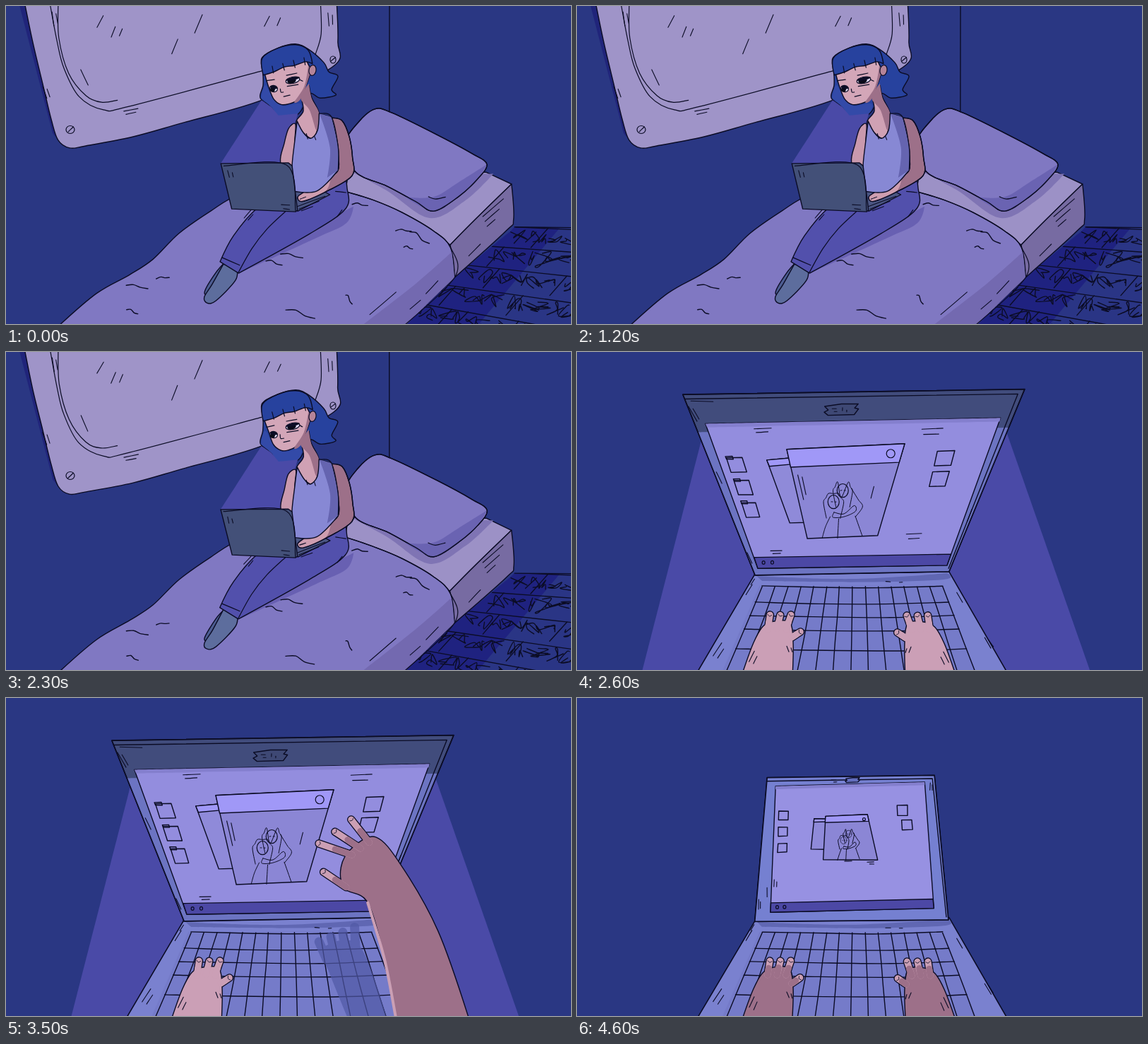
An HTML page that plays this animation: 800 by 450 pixels, repeating every 4.7 s.

```html
<!DOCTYPE html>
<html lang="en">
<head>
<meta charset="utf-8">
<title>Late night laptop</title>
<style>
html, body { margin: 0; width: 100%; height: 100%; overflow: hidden; background: #2a3783; }
svg { display: block; width: 100vw; height: 100vh; }
</style>
</head>
<body>
<svg id="stage" viewBox="0 0 800 450" stroke-linecap="round" stroke-linejoin="round"></svg>
<script>
const LOOP = 4700, STEP = 100, CUT = 2400;
const INK = '#0b0c25', WALL = '#2a3783', BEAM = '#4a4aa7';
const SKIN = '#cb9fb4', SKIN_DARK = '#9d7089', HAIR = '#27429e', QUILT = '#8078c2';
const stage = document.getElementById('stage');
let pose = 0;

const NUM = /-?\d+(\.\d+)?/g;
const span = (t, a, b) => Math.max(0, Math.min(1, (t - a) / (b - a)));
const ease = v => v * v * (3 - 2 * v);
const rnd = n => { const s = Math.sin(n * 12.9898) * 43758.5453; return s - Math.floor(s); };
const times = (n, f) => Array.from({ length: n }, (_, i) => f(i)).join('');
const mix = (a, b, u) => {
  const to = b.match(NUM);
  let i = 0;
  return a.replace(NUM, v => +v + (to[i++] - v) * u);
};
const tint = (a, b, u) => `rgb(${mix(a, b, u)})`;
const numbers = text => text.match(NUM).map(Number);

// Points are "x,y x,y"; "!" marks a corner, a trailing "z" closes the shape.
function trace(text, straight) {
  const closed = text.endsWith('z');
  const pts = text.replace('z', '').trim().split(/\s+/).map(s => {
    const [x, y] = numbers(s);
    const wobble = k => (rnd(x * 7.1 + y * 13.7 + pose * 31 + k) - .5) * .8;
    return { x: x + wobble(1), y: y + wobble(2), sharp: straight || s.endsWith('!') };
  });
  const n = pts.length;
  const at = i => closed ? pts[(i + n) % n] : pts[Math.max(0, Math.min(n - 1, i))];
  const put = (x, y) => `${x.toFixed(1)} ${y.toFixed(1)}`;
  const handle = (i, side) => {
    const p = at(i), k = p.sharp ? 0 : side / 6;
    return put(p.x + (at(i + 1).x - at(i - 1).x) * k, p.y + (at(i + 1).y - at(i - 1).y) * k);
  };
  let d = 'M' + put(pts[0].x, pts[0].y);
  for (let i = 0; i < (closed ? n : n - 1); i++) {
    d += `C${handle(i, 1)} ${handle(i + 1, -1)} ${put(at(i + 1).x, at(i + 1).y)}`;
  }
  return d + (closed ? 'Z' : '');
}

const path = (d, fill, line, w) => `<path d="${d}" fill="${fill}" stroke="${line}" stroke-width="${w}"/>`;
const curve = (pts, fill = 'none', line = INK, w = 1.4) => path(trace(pts), fill, line, w);
const poly = (pts, fill = 'none', line = INK, w = 1.4) => path(trace(pts, true), fill, line, w);
const lines = (list, w = 1.2) => list.split(';').map(s => curve(s.trim(), 'none', INK, w)).join('');
const oval = (x, y, rx, ry, fill = 'none', line = INK, turn = 0) =>
  `<ellipse cx="${x}" cy="${y}" rx="${rx}" ry="${ry}" fill="${fill}" stroke="${line}" stroke-width="1.2" transform="rotate(${turn} ${x} ${y})"/>`;
const group = (body, attrs) => `<g ${attrs}>${body}</g>`;
const shift = (x, y, body) => group(body, `transform="translate(${x} ${y})"`);

// A few parallel pen strokes of falling length.
const hatch = (x, y, dx, dy, n = 2, gap = 6) => times(n, i => {
  const k = 1 - i * .3, sx = x + (Math.abs(dy) > Math.abs(dx) ? gap * i : 3 * i);
  const sy = y + (Math.abs(dy) > Math.abs(dx) ? 3 * i : gap * i);
  return curve(`${sx},${sy} ${sx + dx * k},${sy + dy * k}`, 'none', INK, 1.1);
});
const crease = (x, y, w, drop) =>
  curve(`${x},${y} ${x + w * .35},${y - 2 + drop * .2} ${x + w * .65},${y + drop * .7} ${x + w},${y + drop}`);

function floor() {
  const edge = '720,313 805,313 805,455 558,455 636,383 712,320 z';
  let out = poly(edge, '#2a3585', 'none') + poly('712,313 785,313 665,455 550,455 z', '#1f2280', 'none');
  for (let row = 0; row < 6; row++) {
    const x0 = 722 - row * 34, y0 = 313 + row * 27, slope = .04 + row * .035;
    const y = x => y0 + (x - x0) * slope;
    out += poly(`${x0},${y0} 810,${y(810)}`);
    for (let x = x0 + 45 - row % 2 * 28; x < 800; x += 95) out += poly(`${x},${y(x)} ${x - 24},${y(x) + 27}`);
    for (let x = x0 - 8; x < 800; x += 17) {
      const wander = times(6, i => `${x + rnd(x + i * 5 + row) * 26},${y(x) + 4 + rnd(x * 3 + i + row * 7) * 20} `);
      out += curve(wander);
    }
  }
  return `<clipPath id="floor"><path d="${trace(edge, true)}"/></clipPath>` +
    group(out, 'clip-path="url(#floor)"') + poly('720,313 805,314');
}

const mirror = () =>
  poly('18,-5 34,-5 80,197 66,180 z', '#20247a', 'none') +
  curve('26,-5! 38,53 52,110 64,160 74,190 90,201 112,198 180,185 250,165 362,133 464,85 470,50 468,-5! z', '#9f94c8') +
  lines('62,-5 72,50 82,88 103,128 138,147 175,142 362,92; 74,-5 75,45 89,95 113,127 135,136 158,133; 445,-5 446,40 438,68') +
  hatch(138, 14, -9, 16, 1) + hatch(155, 29, -6, 15, 2, 10) + hatch(278, 12, -11, 26, 1) + hatch(243, 47, -8, 21, 1) +
  hatch(373, 14, -7, 15, 2, 16) + hatch(65, 8, 3, 20) + hatch(52, 114, 6, 17) + hatch(106, 90, 10, 22, 1) +
  hatch(167, 149, 20, -4, 2, 4) + hatch(456, 10, 1, 18) +
  oval(91, 175, 6, 5.5) + lines('88,178 95,171') + oval(463, 76, 4, 5) + lines('460,78 466,73');

function bed() {
  const pillow = '481,195 498,165 522,146 546,151 610,182 660,209 681,224 668,245 640,270 606,290 580,277 540,255 495,235 z';
  return floor() +
    curve('485,235! 680,235! 716,252! 665,301 629,338! 560,300 480,265! z', '#9c91c6') +
    curve('716,252! 719,302 708,319 635,384! 629,338! 665,301 z', '#776ba2') +
    curve('76,452! 128,407 175,380 208,358 245,322 290,290 330,267 400,250! 483,263! 520,275 560,292 605,318 629,342 635,384! 560,455! 72,455! z', QUILT) +
    curve('631,348! 580,393 500,455! 562,455! 635,384! z', '#7369b0', 'none') +
    lines('483,263 520,275 560,292 605,318 629,342 635,384 560,455') +
    curve('490,235! 540,262 600,300 650,275 690,238! z', '#7f74b4', 'none') +
    curve(pillow, QUILT) +
    curve('681,224! 668,245 640,270 606,290 565,270! 605,270 640,250 z', '#6a63b2', 'none') +
    curve(pillow, 'none') + lines('598,270 608,273 622,270') +
    curve('329,379! 440,328 482,307 492,284! 400,330! z', '#6860b2', 'none') +
    hatch(675, 298, 29, -25, 3, 7) + hatch(655, 354, 17, -17, 1) + hatch(515, 437, 37, -32, 1) + hatch(595, 407, 17, -18, 1) + hatch(572, 429, 15, -13, 1) +
    crease(170, 395, 31, 5) + crease(171, 430, 16, 6) + crease(213, 386, 18, -2) + crease(396, 430, 41, 12) + crease(552, 318, 22, 1) +
    crease(572, 320, 27, 16) + crease(563, 341, 13, 3) + crease(389, 351, 31, 5) + crease(368, 361, 23, 6) + crease(490, 281, 22, 1) + crease(481, 409, 9, 13);
}

function head() {
  const eye = (x, y, rx, turn) => oval(x, y, rx, 4.6, '#ded8f1', INK, turn) +
    oval(x - 1.5, y + 1, rx * .62, 3.6, '#090a18', 'none', turn) +
    oval(x, y - 2, rx, 2.2, INK, 'none', turn);
  return curve('366,96! 372,114 379,131 389,139 400,139 413,132 426,110 432,90! 424,74! 380,83! z', '#d3a6b8') +
    curve('428,86! 422,114 408,136 419,129 433,88! z', SKIN_DARK, 'none') +
    oval(434, 91, 5, 7.5, '#b58499', INK, 10) +
    curve('364,98! 363,74 385,60 410,55 428,62 434,82! 424,79 408,84 394,86 380,93 z', HAIR) +
    times(4, i => lines(`${379 + i * 15},${95 - i * 4} ${377 + i * 15},${85 - i * 4}`)) +
    eye(379, 117, 5.5, 12) + eye(406, 105, 10, -12) +
    lines('369,106 380,104; 397,98 412,95; 388,117 389,122 393,122; 393,128 402,126; 398,114 414,111; 416,104 420,106');
}

function girl() {
  const tap = [0, -.7, .5][pose];
  const arm = `460,158! 476,162 486,185 491,214 490,240 455,262 421,${276 + tap} 413,${271 + tap} 422,${263 + tap} 447,246 470,232 468,195 z`;
  return curve('364,92! 363,73 385,60 410,54 428,61 450,80 457,93 470,99 461,118 467,126 445,130 430,124 417,149 405,156 387,155 376,143 360,130 364,112 z', HAIR) +
    curve('361,130! 367,112 379,131 392,141 417,138 412,153 387,156 376,143 z', '#334aa8', 'none') +
    poly('304,223 362,133 376,143 386,155 413,152 409,168 399,177 391,222 z', BEAM, 'none') +
    curve('311,362! 297,378 281,405 290,406 312,382 z', '#4d5d92') +
    curve('308,365! 327,370! 325,388 297,417 285,420 281,412 292,394 z', '#5d6d9d') +
    curve('406,255! 470,232 483,260 480,288 430,322 329,378! 303,362! 322,325 357,285 z', '#5250ac') +
    lines('398,289 370,315 348,343 329,377; 306,356 331,367; 467,262 481,264') + hatch(337, 300, 10, -11) + hatch(469, 298, 7, -9, 1) +
    curve('410,167 400,173 394,195 389,221 402,250 407,240! 409,190 z', '#c999ad') +
    poly('402,262 446,260 459,267 413,290 z', '#4b5683') + hatch(412, 284, 40, -15, 3, 3) +
    curve(arm, SKIN_DARK) +
    curve(`470,233! 447,246 422,${263 + tap} 413,${271 + tap} 421,${276 + tap} 452,263 461,243 z`, '#cf9eb0', 'none') +
    curve(arm) + lines(`416,${273 + tap} 424,${270 + tap}`) +
    curve('416,125! 421,148 411,166 431,187 440,178 443,152 433,130 429,112! z', '#d0a1b4') +
    curve('429,110! 417,130 430,147 440,176 443,152 433,132 z', SKIN_DARK, 'none') +
    curve('412,163! 409,190 405,225 405,262! 440,262 470,232! 470,200 461,157! 443,152! 441,176 431,187 421,179 z', '#8788d4') +
    curve('444,152! 461,157! 470,200 470,232! 455,243! 459,200 z', '#6564b0', 'none') +
    lines('444,152 461,157 470,200 470,232') + hatch(425, 181, 2, 7, 2, 12) +
    head() +
    poly('304,223 400,222 405,226 413,289 410,291 320,287 z', '#435078') +
    lines('308,226 397,225 410,290') + hatch(314, 233, 2, 9) + hatch(390, 281, 12, 1);
}

const bedroom = () => poly('543,-5 543,150') + mirror() + bed() + girl();

// The grip text holds: first tip, tip step, first knuckle, knuckle step, thumb tip, thumb root.
function hand(arm, grip, tone) {
  const [tx, ty, tdx, tdy, kx, ky, kdx, kdy, ...thumb] = numbers(grip);
  const fingers = [0, 1, 2].map(i => [tx + tdx * i, ty + tdy * i, kx + kdx * i, ky + kdy * i]).concat([thumb]);
  const draw = (color, w) => fingers.map(([x, y, a, b]) => curve(`${x},${y} ${a},${b}`, 'none', color, w)).join('');
  const nails = fingers.map(([x, y, a, b]) => {
    const d = Math.hypot(a - x, b - y), c = (a - x) / d * 2, s = (b - y) / d * 2;
    return lines(`${x + s * 1.5},${y - c * 1.5} ${x + c},${y + s} ${x - s * 1.5},${y + c * 1.5}`, .9);
  }).join('');
  return draw(INK, 11.6) + curve(arm + ' z', tone) + draw(SKIN, 9) +
    fingers.map(([x, y, a, b]) => curve(`${(x + a) / 2},${(y + b) / 2} ${a},${b}`, 'none', tone, 9)).join('') + nails;
}

const typingHand = u =>
  hand('234,455! 250,412 264,388 284,380 302,384 306,412 305,455!', '273,372 15,0 270,392 13,0 316,396 304,404',
    tint('203,159,182', '157,112,137', u)) + hatch(244, 438, 7, -15) + hatch(297, 416, 3, 8);

const reachingHand = u =>
  hand(mix('552,455! 536,370 512,290 480,270 474,240 490,212 524,197 560,237 612,330 656,455!',
    '460,455! 464,370 473,290 470,262 476,243 490,232 515,230 522,258 548,335 588,455!', u),
  mix('443,206 23,-17 490,222 12,-9 450,246 482,268', '472,221 16,-2 481,248 13,-3 465,244 475,264', u), SKIN_DARK) +
  curve(mix('552,453 536,370 512,290', '462,453 466,370 475,290', u), 'none', SKIN, 4);

// Maps unit coordinates into a four-cornered area given clockwise from top left.
const area = text => {
  const [ax, ay, bx, by, cx, cy, dx, dy] = numbers(text);
  const blend = (a, b, c, d, x, y) => (a + (b - a) * x) * (1 - y) + (d + (c - d) * x) * y;
  const at = (x, y) => [blend(ax, bx, cx, dx, x, y), blend(ay, by, cy, dy, x, y)];
  const box = (x, y, w, h, fill, line) => poly(
    [at(x, y), at(x + w, y), at(x + w, y + h), at(x, y + h)].join(' ') + ' z', fill, line);
  return { at, box };
};

function family(x, y, s) {
  const person = (px, py, r) => oval(px, py, r, r * 1.2) +
    curve(times(9, i => {
      const a = Math.PI * (.8 + i * .175), k = r * (1.5 + .25 * (i % 2));
      return `${px + Math.cos(a) * k},${py + Math.sin(a) * k + (i === 0 || i === 8 ? r * 2 : 0)} `;
    }), 'none', INK, 1 / s) + lines(`${px - 3},${py} ${px - 1},${py}; ${px + 2},${py} ${px + 4},${py}`, 1);
  return group(person(0, -25, 8) + person(-13, -9, 8) +
    lines('12,-28 22,-12 28,-2 18,12; -18,12 -24,26 -29,42; -6,15 -7,42; 18,11 28,39; -12,6 2,8 16,-4 18,4 2,12 -14,13 -12,6', 1 / s),
    `transform="translate(${x} ${y}) scale(${s})"`);
}

function lid(u) {
  const frame = mix('150,60 634,53 527,311 252,316', '269,113 506,109 526,314 252,316', u);
  const body = area(frame);
  const view = area(mix('182,101 600,93 524,302 256,306', '281,125 492,119 505,298 274,303', u));
  const pane = mix('297,138 464,130 426,260 326,264', '352,167 411,165 426,229 349,229', u);
  const win = area(pane), back = area(mix('269,153 301,150 323,241 301,242', '336,171 354,171 351,214 331,214', u));
  let out = poly(frame + ' z', tint('65,76,124', '112,123,205', u)) +
    body.box(0, .21 * (1 - u), 1, 1 - .21 * (1 - u), tint('108,116,194', '117,128,209', u), 'none') +
    poly(frame + ' z', 'none', INK, 1.7) + poly([body.at(0, .025), body.at(.985, .025), body.at(.99, .98)].join(' ')) +
    view.box(0, 0, 1, 1, tint('147,141,222', '151,145,226', u)) +
    view.box(0, 0, 1, .025, '#847fce', 'none') + view.box(0, .925, 1, .075, '#4c48a5');
  for (const x of [.04, .085]) out += oval(...view.at(x, .962), 2, 2.4);

  // desktop icons
  const squash = 1 - .17 * u;
  for (let i = 0; i < 3; i++) {
    const y = (.24 + i * .155) * squash;
    out += view.box(.03, y, .06, .1 - .03 * u, 'none');
    if (u < .5) out += view.box(.03, y - .012, .025, .02, 'none');
    if (i < 2) out += view.box(.81 + .025 * i * u, y - .02 - i * .015, .065, .1 - .02 * u, 'none');
  }

  out += back.box(0, 0, 1, 1, '#8f8ad9') + back.box(0, 0, 1, .1, '#a098f7') +
    win.box(0, 0, 1, 1, '#8b86d5') + win.box(0, 0, 1, .2 - .05 * u, '#a098f7') +
    oval(...win.at(.9, .1), 6 - 4 * u, 6 - 4 * u) + family(...win.at(.49, .68 - .04 * u), 1 - .45 * u);
  const tape = area(mix('351,77 398,73 395,88 353,90', '381,114 400,113 399,119 381,120', u));
  out += poly([[0, 0], [.5, -.1], [1, 0], [.92, .4], [1.05, .5], [.94, 1], [.05, 1], [-.05, .6], [.08, .4]]
    .map(p => tape.at(...p)).join(' ') + ' z', tint('62,72,116', '100,111,191', u));
  return out + (u < .5
    ? hatch(313, 174, 8, 35) + hatch(420, 190, -4, 17, 1) + hatch(251, 109, 24, -1, 2, 5) + hatch(488, 109, 30, -1, 2, 8) +
      hatch(466, 258, 22, -1) + hatch(274, 281, 16, 0, 2, 4) + hatch(158, 77, 12, 21) + hatch(197, 170, 8, 16, 1) +
      hatch(241, 284, 7, 15, 1) + hatch(559, 223, -7, 17, 1) + hatch(161, 69, 32, 1, 1) + hatch(361, 80, 6, 0, 2, 4) + hatch(376, 79, 0, 4)
    : hatch(379, 231, 10, 0, 1) + hatch(411, 232, 9, 0, 2, 3) + hatch(279, 257, 0, 10, 2, 4) + hatch(269, 268, 0, 13, 1) +
      hatch(257, 285, 0, 14, 2, 3) + hatch(500, 120, 0, 10, 2, 3) + hatch(360, 116, 7, 0, 2, 3));
}

function keyboard() {
  let out = poly('252,315 527,311 610,455 169,455 z', '#7a81cf', INK, 1.6) +
    curve('255,317! 390,321 524,313! 519,322 400,326 262,324! z', '#6067b3', 'none') +
    poly('258,331 519,331 566,455 204,455 z', '#757bc9', 'none');
  const left = y => 262 - (y - 332) * .42, right = y => 518 + (y - 332) * .38;
  out += times(15, i => {
    const x = y => left(y) + (right(y) - left(y)) * i / 14;
    return curve([332, 372, 410, 455].map(y => `${x(y)},${y}`).join(' '));
  });
  for (const y of [332, 355, 374, 393, 421]) {
    out += curve(`${left(y)},${y - 1} ${left(y) + 90},${y + 1} ${right(y) - 90},${y + 2} ${right(y)},${y - 1}`);
  }
  return out + hatch(246, 329, 5, -8, 1) + hatch(239, 343, 9, -14, 1) + hatch(193, 430, 12, -18) +
    hatch(538, 340, 8, 14, 1) + hatch(577, 404, 9, 15) + hatch(437, 325, 7, 0, 1) + hatch(456, 326, 5, 0, 1);
}

function desk(t) {
  const u = ease(span(t, 3600, 4100));
  const raise = span(t, 3100, 3400), back = span(t, 4200, 4400);
  const tap = Math.floor(t / STEP) % 2;
  const away = raise > 0 && back < 1;
  let out = group(poly(mix('179,112 606,108 728,455 91,455 z', '270,130 506,130 610,455 169,455 z', u * .5), BEAM, 'none'), `opacity="${1 - u}"`) +
    keyboard() + lid(u);
  if (away) {
    const shade = curve('485,455! 458,390 448,355 500,350 540,455! z', '#5159a6', 'none') +
      times(4, i => curve(`${443 + i * 17},${345 - i * 7} ${454 + i * 14},370`, 'none', '#5159a6', 13));
    out += group(shade, `opacity="${.7 * raise * (1 - u)}"`);
  }
  out += shift(0, away ? 0 : tap, typingHand(u));
  if (!away) return out + group(typingHand(u), `transform="translate(770 ${1 - tap}) scale(-1 1)"`);
  const sway = 35 * Math.sin(Math.PI * span(t, 3500, 4100)) - 30 * (1 - raise);
  return out + shift(sway, 150 * (1 - raise + back), reachingHand(u));
}

let shown = -1;
const start = performance.now();
function tick() {
  const frame = Math.floor((performance.now() - start) % LOOP / STEP);
  if (frame !== shown) {
    shown = frame;
    pose = frame % 3;
    const t = frame * STEP;
    stage.innerHTML = `<rect width="800" height="450" fill="${WALL}"/>` + (t < CUT ? bedroom() : desk(t));
  }
  requestAnimationFrame(tick);
}
tick();
</script>
</body>
</html>
```
